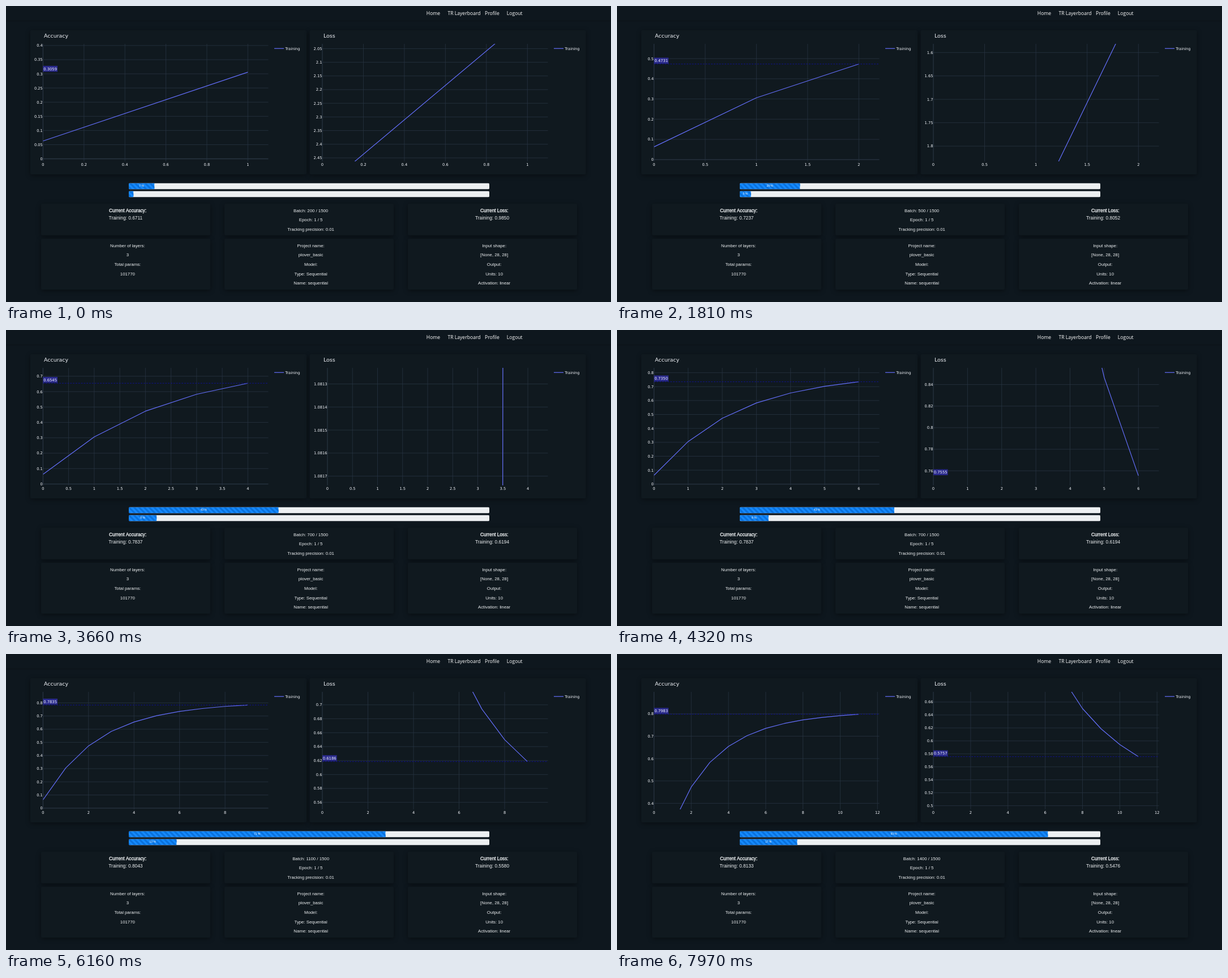
These frames come from a looping animation (1069x524 px, 8 s). An HTML page with a canvas:

```html
<!DOCTYPE html>
<html lang="en">
<head>
<meta charset="utf-8">
<title>Training dashboard</title>
<style>
html, body { margin: 0; width: 100%; height: 100%; overflow: hidden; background: #0e171e; }
canvas { display: block; width: 1069px; height: 524px; }
</style>
</head>
<body>
<canvas id="stage" width="1069" height="524"></canvas>
<script>
const ctx = document.getElementById('stage').getContext('2d');
const LOOP = 8000;
const SANS = '"Liberation Sans", Arial, sans-serif';
const PLOT = '"DejaVu Sans", Verdana, sans-serif';
const NAV = '"Open Sans", "Noto Sans", sans-serif';
const TOP = 67, BOTTOM = 275;

const accuracy = [.0628, .3059, .4731, .583, .6545, .7025, .735, .757, .773, .7835, .7918, .7983];
const loss = [2.5626, 1.9325, 1.4815, 1.18174, .98123, .8465, .7555, .694, .65, .6186, .5944, .5757];

// [start, newest point, guide line shown]
const accuracySteps = [[0, 1, 0], [870, 2, 1], [2500, 4, 1], [3840, 6, 1], [5140, 9, 1], [6220, 10, 0], [6850, 11, 1]];
const lossSteps = [[0, 1, 0], [870, 2, 0], [2500, 4, 0], [3840, 6, 0], [5240, 9, 1], [6220, 10, 0], [6850, 11, 1]];
// [start, batch, accuracy, loss]
const statusSteps = [
  [0, 200, '0.6711', '0.9850'], [50, 300, '0.7004', '0.8905'], [870, 400, '0.7004', '0.8905'],
  [1710, 500, '0.7237', '0.8052'], [2500, 600, '0.7837', '0.6194'], [3330, 700, '0.7837', '0.6194'],
  [4680, 1000, '0.7999', '0.5721'], [5640, 1100, '0.8043', '0.5580'],
  [6850, 1200, '0.8043', '0.5476'], [7640, 1400, '0.8133', '0.5476']
];
// [start, finished tracking steps]
const barSteps = [[50, 2], [1725, 4], [2500, 5], [3350, 6], [5140, 9], [5640, 10], [6850, 11], [7800, 13]];
const pauses = [[0, 50], [820, 870], [1660, 1710], [2270, 2500], [3300, 3330], [3660, 3840], [4630, 4680],
  [4860, 5140], [5930, 5980], [6770, 6800], [7590, 7640]];

const clamp = v => Math.max(0, Math.min(1, v));
const current = (steps, t) => steps.filter(s => s[0] <= t).pop();
const activeTime = t => pauses.reduce((a, [from, to]) => a - Math.max(0, Math.min(t, to) - from), t);

function ease(x) {
  if (x <= 0 || x >= 1) return clamp(x);
  let lo = 0, hi = 1, u = .5;
  for (let i = 0; i < 18; i++) {
    u = (lo + hi) / 2;
    const px = .75 * u * (1 - u) + u ** 3;
    if (px < x) lo = u; else hi = u;
  }
  return .3 * u * (1 - u) ** 2 + 3 * u * u * (1 - u) + u ** 3;
}

function text(str, x, y, size, family = SANS, align = 'center', color = '#edf0f2') {
  ctx.font = `${size}px ${family}`;
  ctx.textAlign = align;
  ctx.fillStyle = color;
  ctx.fillText(str, x, y + size * .36);
}

function heading(str, x, y) {
  text(str, x, y, 8.25);
  ctx.strokeStyle = '#edf0f2';
  ctx.lineWidth = .35;
  ctx.strokeText(str, x, y + 8.25 * .36);
}

function line(x1, y1, x2, y2, color, width, dash = []) {
  ctx.setLineDash(dash);
  ctx.strokeStyle = color;
  ctx.lineWidth = width;
  ctx.beginPath();
  ctx.moveTo(x1, y1);
  ctx.lineTo(x2, y2);
  ctx.stroke();
  ctx.setLineDash([]);
}

function card(x, y, w, h) {
  ctx.save();
  ctx.shadowColor = 'rgba(0,0,0,.4)';
  ctx.shadowBlur = 9;
  ctx.shadowOffsetY = 2;
  ctx.fillStyle = '#10191f';
  ctx.beginPath();
  ctx.roundRect(x, y, w, h, 2);
  ctx.fill();
  ctx.restore();
}

function tickStep(rough) {
  const base = 10 ** Math.floor(Math.log10(rough));
  return base * [1, 2, 5, 10].find(m => m * base >= rough);
}

function ticks(a, b, count, draw) {
  const lo = Math.min(a, b), hi = Math.max(a, b), step = tickStep((hi - lo) / count);
  for (let i = Math.ceil(lo / step - 1e-6); i * step <= hi; i++) draw(i * step, String(+(i * step).toFixed(5)));
}

function chart(title, left, right, titleX, data, n, low, guide) {
  const high = data[n] + .1, xMax = n * 1.1;
  const px = v => left + v / xMax * (right - left);
  const py = v => BOTTOM - (v - low) / (high - low) * (BOTTOM - TOP);

  text(title, titleX, 52.5, 9.45, PLOT, 'left', '#f2f5fa');
  ticks(0, xMax, 9, (v, label) => {
    line(px(v), TOP, px(v), BOTTOM, '#283442', v ? .8 : 1.2);
    text(label, px(v), 280.5, 6.7, PLOT, 'center', '#f2f5fa');
  });
  ticks(low, high, 9.3, (v, label) => {
    line(left, py(v), right, py(v), '#283442', Math.abs(v) < 1e-9 ? 1.3 : .8);
    text(label, left - .6, py(v), 6.7, PLOT, 'right', '#f2f5fa');
  });

  ctx.save();
  ctx.beginPath();
  ctx.rect(left, TOP, right - left, BOTTOM - TOP);
  ctx.clip();
  ctx.beginPath();
  for (let i = 0; i <= n; i++) ctx.lineTo(px(i), py(data[i]));
  ctx.strokeStyle = '#636efa';
  ctx.lineWidth = 1.2;
  ctx.lineJoin = 'round';
  ctx.stroke();
  ctx.restore();

  const y = py(data[n]);
  if (y >= TOP && y <= BOTTOM) {
    if (guide) line(left, y, right, y, '#10109a', .9, [2.8, 2]);
    ctx.fillStyle = '#2b2b8d';
    ctx.fillRect(left, y - 11.2, 25.6, 10.4);
    text(data[n].toFixed(4), left + .8, y - 6, 6.8, PLOT, 'left', '#f2f5fa');
  }
  const legendX = titleX + 407;
  line(legendX, 75.2, legendX + 17, 75.2, '#636efa', 1.2);
  text('Training', legendX + 19.2, 75.2, 6.7, PLOT, 'left', '#f2f5fa');
}

function bar(y, share, label, phase) {
  const x = 216.8, w = 637.2, h = 11, period = 8.9;
  ctx.save();
  ctx.beginPath();
  ctx.roundRect(x, y, w, h, 2);
  ctx.clip();
  ctx.fillStyle = '#eceff1';
  ctx.fillRect(x, y, w, h);
  ctx.beginPath();
  ctx.rect(x, y, w * share, h);
  ctx.clip();
  ctx.fillStyle = '#158aff';
  ctx.fillRect(x, y, w * share, h);
  ctx.fillStyle = '#0b72dd';
  for (let s = x - 2 * period - phase; s < x + w * share; s += period) {
    ctx.beginPath();
    ctx.moveTo(s, y);
    ctx.lineTo(s + period / 2, y);
    ctx.lineTo(s + period / 2 + h, y + h);
    ctx.lineTo(s + h, y + h);
    ctx.fill();
  }
  if (label > 1) text(`${label} %`, x + w * share / 2, y + 5.1, 4.9, SANS, 'center', '#fff');
  ctx.restore();
}

function progress(t) {
  const now = activeTime(t);
  let value = 1, target = 1;
  for (const [start, k] of barSteps) {
    if (start > t) break;
    value += (k - value) * ease((now - activeTime(start)) / 600);
    target = k;
  }
  const phase = now / 1000 * 8.9 % 8.9;
  bar(313.5, value / 14, Math.round(target / 14 * 100), phase);
  bar(327.5, value / 75, Math.floor(target / 75 * 100), phase);
}

function page() {
  ctx.fillStyle = '#0e171e';
  ctx.fillRect(0, 0, 1069, 524);
  line(0, 26.5, 1069, 26.5, 'rgba(0,0,0,.15)', 2);
  [['Home', 742.8], ['TR Layerboard', 780.5], ['Profile', 846], ['Logout', 884.8]]
    .forEach(([s, x]) => text(s, x, 13.2, 8.6, NAV, 'left', '#fff'));
  card(43, 43, 488, 255);
  card(536.5, 43, 488, 255);
  for (const x of [62, 386, 710]) {
    card(x, 350, 299, 56);
    card(x, 412, 299, 90);
  }
}

function details(t) {
  const [, batch, acc, los] = current(statusSteps, t);
  heading('Current Accuracy:', 215, 361.7);
  text(`Training: ${acc}`, 211.4, 374.8, 8.4);
  heading('Current Loss:', 862.8, 361.7);
  text(`Training: ${los}`, 859, 374.8, 8.4);
  [`Batch: ${batch} / 1500`, 'Epoch: 1 / 5', 'Tracking precision: 0.01']
    .forEach((s, i) => text(s, 538.6, 361.7 + i * 16.6, 7.8));
  [
    [214.8, 'Number of layers:', '3', 'Total params:', '101770'],
    [538.6, 'Project name:', 'plover_basic', 'Model:', 'Type: Sequential', 'Name: sequential'],
    [862.6, 'Input shape:', '[None, 28, 28]', 'Output:', 'Units: 10', 'Activation: linear']
  ].forEach(([x, ...rows]) => rows.forEach((s, i) => text(s, x, 423.8 + i * 16.65, 7.8)));
}

function draw(t) {
  page();
  const [, a, accGuide] = current(accuracySteps, t);
  const [, l, lossGuide] = current(lossSteps, t);
  const accLow = Math.max(-.009, accuracy[Math.max(0, a - 9)] - .1);
  chart('Accuracy', 65.4, 463.5, 67, accuracy, a, accLow, accGuide);
  // Four-decimal tick labels need a wider margin.
  chart('Loss', l === 4 ? 568 : 559, 957.5, 561, loss, l, loss[l - 1] - .1, lossGuide);
  progress(t);
  details(t);
}

const began = performance.now();
function frame() {
  draw((performance.now() - began) % LOOP);
  requestAnimationFrame(frame);
}
frame();
</script>
</body>
</html>
```
